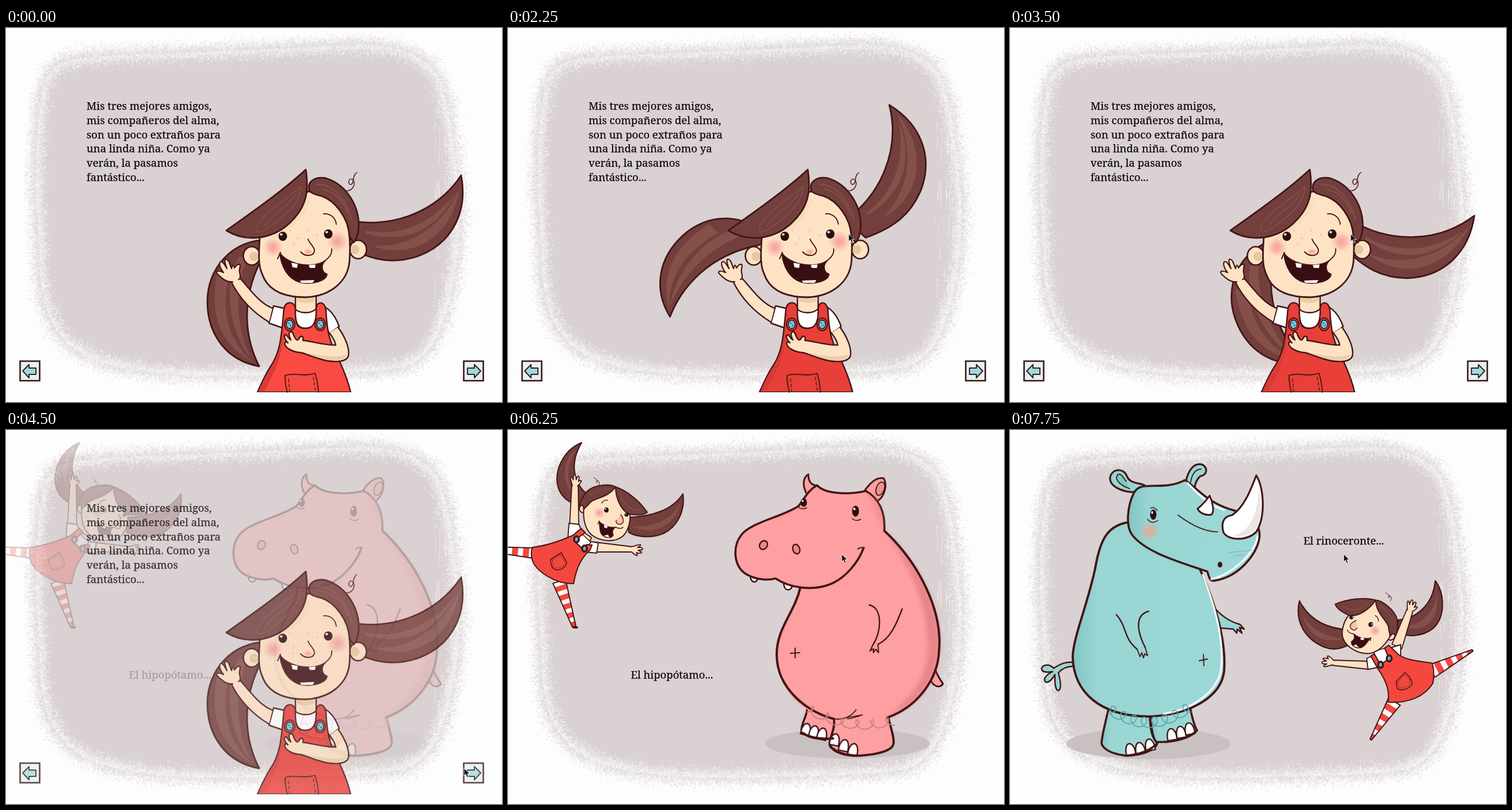
Animation of 862x650 px, one loop 8 s. Source, as an HTML page with a canvas:

```html
<!DOCTYPE html>
<html lang="es">
<head>
<meta charset="utf-8">
<title>Cuento</title>
<style>
html, body { margin: 0; width: 100%; height: 100%; overflow: hidden; background: #fdfdfd; }
canvas, svg { position: absolute; left: 0; top: 0; }
svg { --dress: #fa4b42; }
text { font: 18.5px "Noto Serif", Georgia, serif; fill: #0c0909; stroke: #0c0909; stroke-width: .25px; }
path, ellipse { stroke-linejoin: round; stroke-linecap: round; }
</style>
</head>
<body>
<canvas id="paper" width="862" height="650"></canvas>
<svg id="stage" width="862" height="650" viewBox="0 0 862 650"></svg>
<script>
const INK = '#431516', SKIN = '#fde3c4', HAIR = '#733f3c', LOCK = '#845049', RED = '#f4483f', PINK = '#fe9fa1', TEAL = '#98d5d3';

// Drawing helpers
const path = (d, fill = 'none', width = 2.4, stroke = INK, more = '') =>
  `<path d="${d}" fill="${fill}" stroke="${stroke}" stroke-width="${width}" ${more}/>`;
const flat = (d, fill, more) => path(d, fill, 0, 'none', more);
const oval = (x, y, rx, ry, fill, width = 0, turn = 0) =>
  `<ellipse cx="${x}" cy="${y}" rx="${rx}" ry="${ry}" fill="${fill}" stroke="${INK}" stroke-width="${width}" transform="rotate(${turn} ${x} ${y})"/>`;
const group = (body, attrs = '') => `<g ${attrs}>${body}</g>`;
const text = (x, y, s) => `<text x="${x}" y="${y}">${s}</text>`;
const place = (x, y, turn = 0) => `transform="translate(${x} ${y}) rotate(${turn})"`;
const eye = (x, y, rx, ry) => oval(x, y, rx, ry, '#2c0e0e') + oval(x - rx * .35, y - ry * .4, rx * .3, ry * .25, '#fff');
const blush = (x, y, r, id = 'blush') => oval(x, y, r, r, `url(#${id})`);
const button = (x, y, s) => oval(x, y, 9 * s, 11 * s, RED, 2) + oval(x, y, 6 * s, 7.5 * s, '#62cfe6', 1.8) +
  oval(x - 1.5 * s, y - 2 * s, s, s, INK) + oval(x + 1.5 * s, y + 2 * s, s, s, INK);
const hand = (x, y, turn) => path('M-4 2C-6 -4 -9 -10 -8 -13C-6 -14 -4 -10 -3 -8C-4 -14 -3 -17 -1 -17C1 -17 1 -12 2 -9C3 -13 4 -16 6 -15C8 -13 6 -9 6 -6C8 -8 11 -9 11 -7C10 -4 7 0 5 2', SKIN, 1.8, INK, place(x, y, turn));
const toes = (list, turn) => list.map(([x, y]) => path('M-8 9C-9 -3 -5 -11 0 -11C5 -11 9 -3 8 9Z', '#fff', 2.4, INK, place(x, y, turn))).join('');
const curl = (x, y) => path('M8 14C13 7 6 2 4 7C7 12 9 3 0 0', 'none', 1, INK, place(x, y));

// Tapered leg with red stripes
function leg(x0, y0, x1, y1, w0, w1, stripes) {
  const len = Math.hypot(x1 - x0, y1 - y0), nx = (y0 - y1) / len / 2, ny = (x1 - x0) / len / 2;
  const edge = (u, side) => {
    const w = (w0 + (w1 - w0) * u) * side;
    return `${x0 + (x1 - x0) * u + nx * w} ${y0 + (y1 - y0) * u + ny * w}`;
  };
  const band = (a, b) => `M${edge(a, 1)}L${edge(b, 1)} ${edge(b, -1)} ${edge(a, -1)}Z`;
  let out = flat(band(0, 1), '#fff');
  for (let i = 0; i < stripes; i++) out += flat(band((i + .45) / stripes, (i + 1) / stripes), RED);
  return out + path(band(0, 1), 'none', 2);
}

// Scalloped scribble between two points, with small loops on its upper side
function scribble(x0, y0, x1, y1, sag, loops, r, color) {
  let d = '';
  for (let i = 0; i <= loops * 16; i++) {
    const u = i / loops / 16, a = i / 16 * Math.PI * 2;
    const x = x0 + (x1 - x0) * u + r * Math.sin(a);
    const y = y0 + (y1 - y0) * u + sag * Math.sin(u * Math.PI) + r * Math.cos(a);
    d += (i ? 'L' : 'M') + x.toFixed(1) + ' ' + y.toFixed(1);
  }
  return path(d, 'none', 1.7, color);
}

function bigGirl() {
  const left = path('M462 368C390 366 350 420 350 475C350 535 385 578 440 588C418 545 406 480 441 408Z', HAIR, 2.8) +
    flat('M366 430C354 500 372 550 430 581C386 545 372 490 388 428Z', LOCK) +
    flat('M404 398C376 450 388 530 427 576C402 530 394 460 420 398Z', LOCK);
  const right = path('M592 333C660 350 745 325 791 256C803 320 775 375 715 397C675 410 640 406 592 380Z', HAIR, 2.8) +
    flat('M636 378C700 384 760 345 789 276C776 368 700 404 636 378Z', LOCK) +
    flat('M625 352C690 365 745 335 783 285C752 346 700 378 625 357Z', LOCK);
  const body =
    path('M503 462L503 492C512 500 530 500 539 492L539 462Z', SKIN) +
    flat('M504 466Q520 474 538 466L538 474Q520 482 504 474Z', '#eccda6') +
    path('M465 483L487 488 483 522 457 513Z', '#fff') +
    path('M553 484C567 492 574 504 579 519L562 531 553 512Z', '#fff') +
    path('M502 488C511 497 530 497 539 488C541 515 533 522 520 522C507 522 502 512 502 488Z', '#fff') +
    path('M483 488C485 474 501 474 503 487C502 518 508 522 520 522C534 522 540 512 539 487C540 474 554 474 556 490C558 530 562 545 580 580C590 602 596 620 599 633L437 633C445 615 452 600 460 588C478 562 479 530 483 488Z', 'var(--dress)') +
    flat('M484 522C480 560 476 585 448 632L439 632C446 612 459 592 465 582C476 562 480 545 482 522Z', '#d93a36') +
    `<rect x="430" y="633" width="180" height="4" fill="#fdfdfd"/>` +
    button(493, 515, 1) + button(546, 515, 1) +
    path('M485 604C500 598 520 607 537 600Q542 615 543 633M485 604Q485 620 489 633', 'none', 1.8) +
    path('M491 610L493 632M534 607L538 632', 'none', 1.3, INK, 'stroke-dasharray="5 4"');
  const arms =
    path('M463 487C440 478 425 455 405 433L391 440C405 470 430 495 457 511', SKIN) +
    path('M394 441C385 442 378 438 367 427C364 422 369 421 378 425C371 416 369 406 374 406C378 406 381 414 384 418C380 408 379 401 383 402C388 403 389 412 392 418C394 410 395 411 397 417C399 415 402 409 406 411C409 413 404 420 406 425C408 432 407 437 404 437', SKIN, 2.2) +
    path('M577 520C588 535 598 556 595 570C590 584 560 580 545 575C530 571 521 566 512 564C495 563 487 555 485 551C483 546 486 544 490 547C482 539 483 533 487 533C490 537 492 541 495 542C489 530 493 526 498 529C503 542 506 545 509 540C512 533 518 535 516 543C530 544 555 552 573 551C572 544 566 535 562 530', SKIN) +
    flat('M512 562C545 570 575 575 592 567C588 582 560 578 545 573Z', '#eccda6');
  const head =
    oval(427, 396, 14.5, 16, SKIN, 2.6) + oval(431, 397, 8, 8, '#e6c79f') +
    oval(612, 385, 14.5, 16, SKIN, 2.6) + oval(606, 385, 8, 8, '#e6c79f') +
    path('M441 364C440 385 437 410 445 427C455 457 485 468 521 468C565 466 594 440 597 405C600 355 595 325 570 300C560 290 540 284 524 284L495 320Z', SKIN, 2.8) +
    flat('M528 294C527 325 500 349 452 373L492 340Z', '#f8ddb9') +
    blush(464, 381, 19) + blush(576, 371, 20) +
    path('M383 352C425 322 480 284 521 246C527 285 522 312 492 340C460 369 415 372 383 352Z', HAIR, 2.8) +
    path('M436 352C436 328 485 300 512 276C513 300 492 322 462 343C447 355 437 357 436 352ZM450 345C462 322 490 312 504 289', 'none', 1.6, LOCK) +
    path('M526 278C526 264 540 258 556 261C592 272 614 310 613 345C612 360 609 368 604 373L597 362C595 330 572 300 548 292C535 289 526 286 526 278Z', HAIR, 2.8) +
    path('M540 272C570 270 592 300 601 334M550 280C572 285 588 303 594 322', 'none', 2, LOCK) +
    path('M592 283C603 283 609 270 602 263C597 260 593 268 598 272C607 272 600 257 610 251', 'none', 1.4) +
    eye(481, 362, 7.5, 8) + eye(560, 358, 7.5, 8) +
    path('M552 323C565 322 573 331 574 341', 'none', 1.9) +
    oval(525, 389, 10, 7, 'url(#blush)') +
    path('M525 367C528 376 537 380 536 388C534 397 520 398 512 389', 'none', 1.9) +
    [[494, 352], [500, 376], [524, 352], [541, 360], [507, 365]].map(([x, y]) => oval(x, y, 1.2, 1.2, '#dcb48d')).join('') +
    path('M476 391C484 403 505 413 530 412C543 411 550 408 555 404C546 413 549 425 558 428C556 440 535 445 515 443C490 438 478 415 476 391Z', '#390e11', 2) +
    path('M472 401L477 390M555 404C563 398 567 391 566 384', 'none', 1.9) +
    flat('M496 408L507 410 506 417 498 416ZM526 412L538 411 537 417 528 417ZM511 439L536 438 533 443 513 443Z', '#fff');
  return group(left, 'id="leftTail"') + group(right, 'id="rightTail"') + body + arms + head;
}

function smallHead() {
  return oval(131, 136, 7, 8, SKIN, 2) + oval(133, 137, 4, 4, '#e6c79f') +
    path('M133 125C129 150 132 170 145 182C160 194 185 196 199 185C209 176 213 160 212 147C205 125 190 105 187 99C160 100 140 110 133 125Z', SKIN, 2) +
    blush(159, 144, 11) +
    path('M187 99C180 94 150 93 136 108C126 120 124 130 124 134C129 128 131 131 132 138C135 132 138 133 141 128C146 118 172 120 187 99Z', HAIR, 2) +
    path('M142 113Q157 102 175 103', 'none', 1.4, LOCK) +
    path('M187 99C204 104 228 122 242 143C236 148 222 148 210 146C195 138 187 117 187 99Z', HAIR, 2) +
    path('M196 112C200 133 215 139 230 139', 'none', 1.4, LOCK) +
    eye(171, 139, 4, 4.5) + eye(206, 147, 3.5, 3.5) + path('M163 127Q166 121 173 122', 'none', 1.4) +
    path('M196 147C202 155 202 163 194 164C189 164 187 160 188 157', '#f9c0ab', 1.4) +
    path('M158 159C165 165 175 171 187 169C180 173 181 180 183 182C180 190 165 188 161 178C159 172 160 165 158 159Z', '#390e11', 1.6) +
    path('M156 163L159 158M187 169Q196 173 200 169', 'none', 1.4) +
    flat('M167 165L173 167 172 171 167 169ZM166 184L176 187 174 182Z', '#fff');
}

const tail = (outline, locks) => path(outline, HAIR, 2.2) + flat(locks, LOCK);
const pocket = (d, x, y) => path(d, 'none', 1.5) +
  path(d, 'none', 1, INK, `stroke-dasharray="3 3" transform="translate(${x} ${y}) scale(.76) translate(${-x} ${-y})"`);

function leftGirl() {
  return tail('M128 22C95 35 78 75 88 102C95 120 112 130 130 133L136 110C112 90 108 55 128 22Z', 'M119 33C92 55 91 95 121 119C99 92 100 62 119 33Z') +
    tail('M304 111C285 140 250 150 208 152L210 178C225 187 250 188 270 180C295 168 308 140 304 111Z', 'M300 126C285 157 250 170 215 168C254 184 289 168 300 126Z') +
    leg(45, 214, -12, 209, 18, 11, 3) + leg(89, 263, 115, 342, 23, 6, 5) + oval(117, 343, 5, 2, INK) +
    path('M107 166L111 95 122 95 123 170Z', SKIN, 1.8) + hand(116, 95, 4) +
    path('M152 195L217 203 217 212 152 212Z', SKIN, 1.8) + hand(217, 207, 92) +
    path('M106 162L123 164 132 182 104 190Z', '#fff', 1.9) + path('M138 193L157 196 154 214 134 212Z', '#fff', 1.9) +
    path('M129 176L145 187 138 202 120 188Z', SKIN, 1.8) + path('M126 178L144 195 133 210 113 190Z', '#fff', 1.6) +
    path('M113 183C95 191 70 201 42 204C38 222 42 236 62 250C80 262 98 268 114 267C118 245 124 225 143 208L146 200 137 199 130 207 115 193 134 178 127 171Z', RED, 2) +
    button(119, 190, .55) + button(133, 206, .55) +
    pocket('M74 225L93 213C96 223 102 226 102 232C98 243 84 246 78 240Q74 234 74 225Z', 88, 230) + curl(149, 83) + smallHead();
}

function rightGirl() {
  return tail('M503 297C495 330 510 362 545 377C565 385 580 378 592 372L588 347C550 345 520 330 503 297Z', 'M507 318C520 347 552 361 580 362C546 374 517 357 507 318Z') +
    tail('M739 262C756 285 757 325 735 345C715 360 690 360 672 352L675 330C705 328 735 305 739 262Z', 'M742 283C738 319 711 341 684 342C722 355 747 328 742 283Z') +
    leg(733, 419, 804, 383, 24, 3, 4) + leg(668, 472, 627, 538, 24, 3, 4) +
    path('M664 372L690 311 700 315 681 380Z', SKIN, 1.8) + hand(695, 312, 18) +
    path('M626 402L560 400 560 409 624 416Z', SKIN, 1.8) + hand(559, 404, -86) +
    path('M657 380L679 373 679 396 660 398Z', '#fff', 1.9) + path('M620 397L637 389 652 410 622 416Z', '#fff', 1.9) +
    path('M632 385L655 378 662 397 642 411Z', '#fff', 1.6) +
    path('M640 416C650 430 661 450 657 473C690 475 720 465 735 440C738 425 736 410 733 405C710 402 690 400 676 391L658 374 651 379 659 397 644 408 633 389 627 393Z', RED, 2) +
    button(644, 408, .55) + button(659, 397, .55) +
    pocket('M671 437L687 421C690 427 697 428 699 441C693 452 678 454 673 449Z', 684, 438) + curl(653, 283) +
    group(smallHead(), 'transform="translate(627 338) rotate(33) scale(-1 1) translate(-171 -139)"');
}

function hippo() {
  return oval(590, 545, 143, 26, '#c9c0c1') +
    path('M741 412C746 428 752 435 756 441C752 449 737 448 733 429', PINK, 3) +
    path('M520 476C522 495 511 505 510 521C515 536 545 539 565 536L568 500Z', PINK, 3.6) +
    path('M566 498C570 520 558 535 559 547C565 562 590 567 612 566C640 564 668 558 670 545C672 535 664 515 659 490Z', PINK, 3.8) +
    flat('M505 270C500 310 466 345 467 392C468 450 510 495 566 502C600 504 630 505 659 500C700 492 745 440 749 385C756 315 715 232 654 175L600 200Z', PINK) +
    flat('M654 175C715 232 756 315 749 385C747 430 715 480 659 500C705 462 731 425 730 375C729 305 700 235 654 175Z', '#df7c80', 'filter="url(#soft)" opacity=".75"') +
    path('M508 274C498 318 466 345 467 392C468 450 520 490 566 502M659 500C715 480 747 430 749 385C756 315 715 232 654 175', 'none', 4) +
    path('M566 502Q592 505 605 486M572 503L616 495Q600 501 590 502', 'none', 1.6) +
    path('M537 97C525 95 522 88 522 77C512 83 512 96 518 109', PINK, 3) +
    path('M618 108C628 93 640 81 653 84C660 96 654 115 644 122', PINK, 3) + oval(647, 102, 7, 12, '#f08f92', 1.8, 20) +
    path('M421 250C420 268 434 268 435 254Z', '#fff', 2.6) + path('M479 266C480 282 493 280 494 270Z', '#fff', 2.6) +
    path('M618 205C608 232 585 258 560 268C530 280 490 275 465 258C450 262 430 260 413 250C392 236 390 203 405 183C422 160 480 150 505 132C515 120 520 106 537 96C550 111 590 113 622 106C644 118 656 142 654 175', PINK, 3.6) +
    flat('M624 110C644 122 654 145 652 175C645 150 636 128 624 110Z', '#df7c80', 'filter="url(#soft)" opacity=".6"') +
    path('M608 207Q612 203 619 205', 'none', 2) +
    oval(444, 200, 8, 6.5, '#ec878a', 2.4, -55) + oval(501, 207, 6, 8.5, '#ec878a', 2.4, -20) +
    eye(514, 126, 5.5, 7.5) + eye(604, 141, 6, 9.5) +
    path('M504 133Q510 140 519 135M598 154Q605 160 613 155', 'none', 1.5) +
    path('M499 379L499 396M491 388L507 387', 'none', 2) +
    path('M628 304C652 310 649 350 634 374M685 311C674 340 664 362 644 372', 'none', 2.4) +
    path('M634 374L629 384 635 380 635 387 639 381 644 387 643 372', PINK, 2) +
    toes([[518, 521], [532, 525], [546, 529]], 12) + toes([[568, 539], [584, 549], [600, 556]], 12) +
    path('M511 526Q530 539 565 536M560 550Q578 567 612 566', 'none', 4) +
    scribble(516, 482, 672, 505, 17, 6, 8, '#c47c7f');
}

function rhino() {
  const fill = 'url(#rhinoSkin)';
  return oval(241, 545, 143, 27, '#c9c0c1') +
    path('M113 404C96 402 87 407 76 414C65 403 51 411 56 418C61 423 68 420 74 420C62 426 57 433 62 438C68 440 75 431 78 425C78 438 78 452 84 453C91 450 87 433 84 422C93 412 103 410 113 411', TEAL, 2.5) +
    path('M358 312C370 325 385 334 400 338L407 346 399 343 403 353 395 346 394 353 388 346 364 344', TEAL, 2.5) +
    path('M172 482C165 510 160 530 159 545C165 562 200 568 215 565C240 562 255 552 256 544C248 535 243 525 243 490Z', fill, 3.6) +
    path('M245 492C244 520 250 540 255 542C285 544 315 535 325 522C318 510 316 495 312 478Z', fill, 3.6) +
    toes([[209, 556], [226, 554], [243, 548]], -12) + toes([[281, 530], [297, 526], [312, 520]], -10) +
    path('M200 566Q240 563 256 544M270 542Q310 538 325 522', 'none', 3.6) +
    path('M208 160C170 165 158 190 150 230C140 290 109 360 109 395C111 455 155 497 240 498C320 495 367 460 372 420C377 360 350 285 330 242Z', fill, 3.9) +
    path('M335 252C358 310 372 365 367 415C361 455 318 485 268 493', 'none', 3.5, '#eef9f8') +
    path('M217 108C195 108 172 98 174 82C178 66 198 66 203 80C209 94 223 91 234 96', TEAL, 3.2) + path('M208 102C190 96 180 84 188 77C194 75 197 84 202 89', '#81c5c4', 1.8) +
    path('M306 88C310 70 320 56 334 60C345 66 342 79 331 80C325 85 322 92 321 100', TEAL, 3.2) + path('M314 91C316 76 323 68 332 68', 'none', 1.8) +
    path('M215 110C227 85 265 108 304 87C330 105 345 128 390 140C420 150 438 165 433 190C428 215 400 255 355 262C346 262 346 255 343 246C290 228 235 212 212 182C200 165 205 130 215 110Z', fill, 3.6) +
    path('M308 92C325 108 342 129 372 139M350 259C385 252 428 212 430 185', 'none', 3.5, '#eef9f8') +
    path('M347 114C352 125 356 142 350 147C341 149 330 145 326 137C333 131 341 123 347 114Z', '#fff', 3) +
    path('M428 79C441 100 445 150 428 177C412 193 380 193 371 178C366 160 372 150 386 148C407 134 418 105 428 79Z', '#fff', 3.2) +
    flat('M432 101C438 130 438 160 426 174C412 186 395 187 386 184C417 178 431 146 432 101Z', '#ebe6e6') +
    blush(243, 176, 20, 'rust') + eye(249, 147, 5.5, 9) +
    path('M239 155Q247 165 257 157M244 136Q250 132 256 140', 'none', 1.4) +
    path('M292 148C315 165 340 177 361 177', 'none', 1.7) + path('M380 213L421 209M388 219L408 216', 'none', 1.2, '#72b2b4') +
    oval(365, 234, 4, 5, INK) +
    path('M185 321C204 343 197 362 221 381M241 315C215 322 222 353 235 378', 'none', 2.4) +
    path('M221 381L226 394 229 387 232 396 234 389 239 392 235 378', TEAL, 1.9) +
    path('M336 390L337 410M329 401L343 398', 'none', 1.8) +
    scribble(170, 484, 314, 481, 26, 8, 9, '#5da5a8');
}

const lines = ['Mis tres mejores amigos,', 'mis compañeros del alma,', 'son un poco extraños para', 'una linda niña. Como ya', 'verán, la pasamos', 'fantástico...'];
const arrow = group(`<rect x="24.5" y="579" width="34" height="34" fill="#e0f4f4" stroke="${INK}" stroke-width="2.6"/>` +
  path('M29 596L40 585V591H52V602H40V608Z', '#9edbdd', 1.9));
const fade = (id, ...stops) => `<radialGradient id="${id}">${stops.map(([o, a, c]) => `<stop offset="${o}" stop-color="${c}" stop-opacity="${a}"/>`).join('')}</radialGradient>`;
const ramp = (id, ...stops) => `<linearGradient id="${id}">${stops.map(([o, c]) => `<stop offset="${o}" stop-color="${c}"/>`).join('')}</linearGradient>`;
const $ = id => document.getElementById(id);

$('stage').innerHTML =
  '<filter id="soft"><feGaussianBlur stdDeviation="4"/></filter>' +
  fade('blush', [0, .95, '#f69a98'], [.5, .65, '#f8aaa4'], [1, 0, '#fcd0b8']) +
  fade('rust', [0, .9, '#e9a48e'], [.5, .6, '#dfae9c'], [1, 0, '#b0cbc4']) +
  ramp('rhinoSkin', [0, '#83c5c4'], [.16, TEAL], [1, '#9bd8d6']) +
  group(rhino() + rightGirl() + text(510, 199, 'El rinoceronte...'), 'id="page3"') +
  group(hippo() + leftGirl() + text(213.5, 432, 'El hipopótamo...'), 'id="page2"') +
  group(lines.map((s, i) => text(140, 142 + i * 24.8, s)).join('') + bigGirl() + arrow +
    group(arrow, 'transform="translate(854 0) scale(-1 1)"'), 'id="page1"') +
  group(path('M0 0V13L3 10.3 5.3 15.5 7.6 14.5 5.4 9.5H9.5Z', '#111', .8, '#fff'), 'id="cursor"');

// Dry-brushed paper: a soft rim broken up by fine strokes across it
function paintPaper() {
  const ctx = $('paper').getContext('2d');
  let seed = 7;
  const rnd = () => (seed = seed * 16807 % 2147483647) / 2147483647;
  const rim = [[72, 62], [150, 47], [300, 42], [450, 36], [560, 30], [640, 27], [705, 40], [750, 75], [770, 150], [782, 250], [789, 330], [780, 420], [763, 500], [738, 560], [690, 592], [600, 597], [480, 601], [330, 604], [210, 593], [130, 568], [82, 525], [60, 460], [56, 370], [50, 260], [54, 150]];
  const mid = (a, b) => [(a[0] + b[0]) / 2, (a[1] + b[1]) / 2];
  const n = rim.length, grey = '#dad1d2', white = '#fdfdfd';
  ctx.fillStyle = grey;
  ctx.filter = 'blur(9px)';
  ctx.beginPath();
  ctx.moveTo(...mid(rim[n - 1], rim[0]));
  rim.forEach((p, i) => ctx.quadraticCurveTo(...p, ...mid(p, rim[(i + 1) % n])));
  ctx.fill();
  ctx.filter = 'none';
  ctx.globalAlpha = .5;
  rim.forEach((b, i) => {
    const a = mid(rim[(i + n - 1) % n], b), c = mid(b, rim[(i + 1) % n]);
    for (let k = Math.hypot(c[0] - a[0], c[1] - a[1]) * 7; k > 0; k--) {
      const u = rnd(), v = 1 - u;
      const x = v * v * a[0] + 2 * u * v * b[0] + u * u * c[0], y = v * v * a[1] + 2 * u * v * b[1] + u * u * c[1];
      const dx = v * (b[0] - a[0]) + u * (c[0] - b[0]), dy = v * (b[1] - a[1]) + u * (c[1] - b[1]), len = Math.hypot(dx, dy);
      const off = (rnd() + rnd() + rnd() - 1.5) * 19, size = 1 + rnd() * 3, flatRim = Math.abs(dx) > Math.abs(dy);
      ctx.fillStyle = off > 0 ? grey : white;
      ctx.fillRect(x + dy / len * off, y - dx / len * off, flatRim ? 1.2 : size, flatRim ? size : 1.2);
    }
  });
  ctx.fillStyle = white;
  for (let i = 0; i < 35; i++) ctx.fillRect(742 + rnd() * 32, 110 + rnd() * 400, 1, 8 + rnd() * 35);
}
paintPaper();

// Values hold from the given 250 ms step until the next entry
const tracks = {
  tails: [[0, 0], [8, 15], [9, 48], [10, 70], [11, 62], [12, 34], [13, 2], [14, -19], [15, -9], [16, 3], [17, 0]],
  cursor: [[0, null], [2, [538, 290]], [3, [623, 366]], [5, [604, 362]], [6, [592, 358]], [15, [640, 420]], [16, [735, 525]], [17, [796, 588]], [21, [775, 550]], [22, [690, 420]], [23, [605, 300]], [24, [575, 247]], [25, [580, 216]]],
  page1: [[0, 1], [18, .8], [19, .6], [20, .38], [21, .15], [22, 0]],
  page2: [[0, 0], [18, .25], [19, .5], [20, .76], [21, .93], [22, 1], [27, .85], [28, .6], [29, .35], [30, .1], [31, 0]],
  page3: [[0, 0], [27, .2], [28, .5], [29, .75], [30, .95], [31, 1]],
  dress: [[0, '#fa4b42'], [5, '#e83f38']]
};
const at = (name, step) => tracks[name].filter(([s]) => s <= step).pop()[1];

function draw(now) {
  const step = Math.floor(now % 8000 / 250), swing = at('tails', step), spot = at('cursor', step);
  $('leftTail').setAttribute('transform', `rotate(${swing} 457.5 367)`);
  $('rightTail').setAttribute('transform', `rotate(${-swing} 589.4 339)`);
  $('cursor').setAttribute('visibility', spot ? 'visible' : 'hidden');
  if (spot) $('cursor').setAttribute('transform', `translate(${spot})`);
  for (const id of ['page1', 'page2', 'page3']) $(id).setAttribute('opacity', at(id, step));
  $('stage').style.setProperty('--dress', at('dress', step));
}
const start = performance.now();
function tick() {
  draw(performance.now() - start);
  requestAnimationFrame(tick);
}
tick();
</script>
</body>
</html>
```
